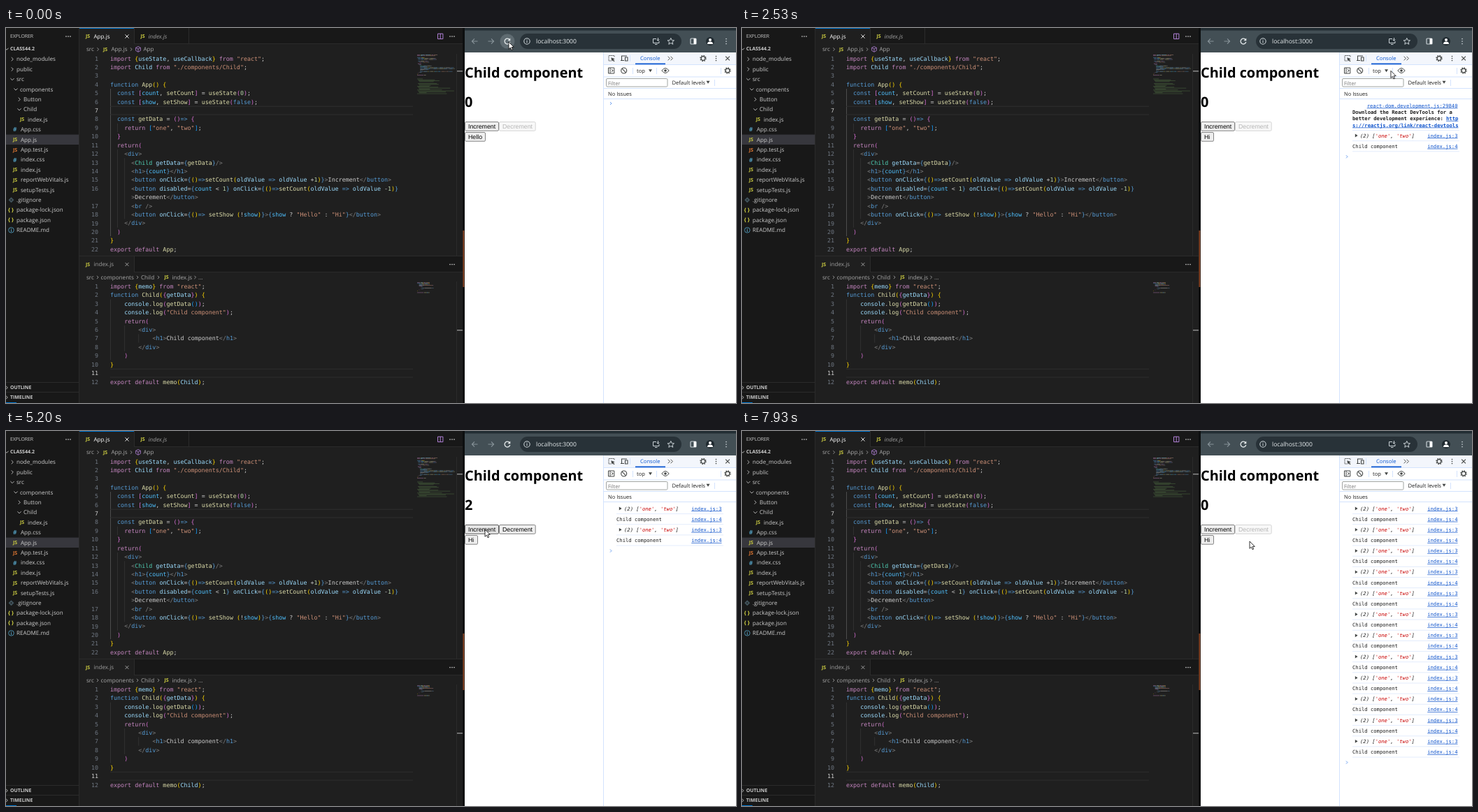
An HTML page that plays this animation: 1044x537 px, repeating every 8 s.

```html
<!DOCTYPE html>
<html lang="en">
<head>
<meta charset="utf-8">
<title>Child component</title>
<style>
html, body { margin: 0; width: 100%; height: 100%; overflow: hidden; background: #181818; }
svg { display: block; width: 100%; height: 100%; }
text { font-family: "Open Sans", "Noto Sans", sans-serif; white-space: pre; text-rendering: geometricPrecision; }
.mono { font-family: "DejaVu Sans Mono", monospace; }
.form { font-family: "Liberation Sans", Arial, sans-serif; }
</style>
</head>
<body>
<svg id="stage" viewBox="0 0 1044 537"></svg>
<script>
const LOOP = 8000, FPS = 15;
const stage = document.getElementById('stage');

// Drawing helpers; text is placed by its vertical centre
const esc = s => String(s).replace(/[&<>]/g, c => ({ '&': '&amp;', '<': '&lt;', '>': '&gt;' })[c]);
const text = (x, y, s, size, fill, more = '') =>
  `<text x="${x}" y="${y + size * .35}" font-size="${size}" fill="${fill}" ${more}>${esc(s)}</text>`;
const rect = (x, y, w, h, fill, more = '') =>
  `<rect x="${x}" y="${y}" width="${w}" height="${h}" fill="${fill}" ${more}/>`;
const line = (d, stroke, width = 1, more = '') =>
  `<path d="${d}" fill="none" stroke="${stroke}" stroke-width="${width}" ${more}/>`;
const shape = (d, fill) => `<path d="${d}" fill="${fill}"/>`;
const ring = (x, y, r, stroke, width = 1, more = '') =>
  `<circle cx="${x}" cy="${y}" r="${r}" fill="none" stroke="${stroke}" stroke-width="${width}" ${more}/>`;
const dot = (x, y, r, fill) => `<circle cx="${x}" cy="${y}" r="${r}" fill="${fill}"/>`;
const dots = (x, y, fill, dx, dy) => [-1, 0, 1].map(i => dot(x + i * dx, y + i * dy, .85, fill)).join('');
const cross = (x, y, r, stroke, width = 1) =>
  line(`M${x - r} ${y - r}l${2 * r} ${2 * r}m0 ${-2 * r}l${-2 * r} ${2 * r}`, stroke, width);
const gear = (x, y) => ring(x, y, 2.8, '#444746', 1.2) + ring(x, y, 4, '#444746', 1.4, 'stroke-dasharray="1.6 1.54"');
const right = (x, y, c = '#a0a0a0', r = 2.2) => line(`M${x - r / 2} ${y - r}l${r} ${r}l${-r} ${r}`, c, .9);
const down = (x, y) => line(`M${x - 2.6} ${y - 1.3}l2.6 2.6l2.6 -2.6`, '#c5c5c5', .9);
const caret = (x, y) => shape(`M${x - 2.5} ${y - 1.8}h5l-2.5 4z`, '#444746');
const js = (x, y, fill = '#cbcb41') => text(x, y, 'JS', 7, fill, 'font-weight="700"');

const GREY = '#a9a9a9', EDGE = '#2b2b2b', UI = 8.1;

// Code: "~" and a letter start a run of that colour
const INK = { k: '#c586c0', b: '#569cd6', v: '#9cdcfe', f: '#dcdcaa', s: '#ce9178', n: '#b5cea8', c: '#4ec9b0',
  t: '#4fc1ff', y: '#ffd700', o: '#da70d6', u: '#179fff', g: '#808080', w: '#cccccc' };
const APP = `~kimport ~y{~vuseState~w, ~vuseCallback~y} ~kfrom ~s"react"~w;
~kimport ~vChild ~kfrom ~s"./components/Child"~w;

~bfunction ~fApp~y() {
  ~bconst ~o[~tcount~w, ~fsetCount~o] ~w= ~fuseState~o(~n0~o)~w;
  ~bconst ~o[~tshow~w, ~fsetShow~o] ~w= ~fuseState~o(~bfalse~o)~w;

  ~bconst ~fgetData ~w= ~o()~b=> ~o{
    ~kreturn ~u[~s"one"~w, ~s"two"~u]~w;
  ~o}
  ~kreturn~o(
    ~g<~bdiv~g>
      ~g<~cChild ~vgetData~w=~b{~fgetData~b}~g/>
      ~g<~bh1~g>~b{~tcount~b}~g</~bh1~g>
      ~g<~bbutton ~vonClick~w=~b{~y()~b=>~fsetCount~y(~voldValue ~b=> ~voldValue ~w+~n1~y)~b}~g>~wIncrement~g</~bbutton~g>
      ~g<~bbutton ~vdisabled~w=~b{~tcount ~w< ~n1~b} ~vonClick~w=~b{~y()~b=>~fsetCount~y(~voldValue ~b=> ~voldValue ~w-~n1~y)~b}
      ~g>~wDecrement~g</~bbutton~g>
      ~g<~bbr ~g/>
      ~g<~bbutton ~vonClick~w=~b{~y()~b=> ~fsetShow ~y(~w!~tshow~y)~b}~g>~b{~tshow ~w? ~s"Hello" ~w: ~s"Hi"~b}~g</~bbutton~g>
    ~g</~bdiv~g>
  ~o)
~y}
~kexport default ~fApp~w;`.split('\n');
const CHILD = `~kimport ~y{~vmemo~y} ~kfrom ~s"react"~w;
~bfunction ~fChild~y(~o{~vgetData~o}~y) {
    ~vconsole~w.~flog~o(~fgetData~u()~o)~w;
    ~vconsole~w.~flog~o(~s"Child component"~o)~w;
    ~kreturn~o(
        ~g<~bdiv~g>
            ~g<~bh1~g>~wChild component~g</~bh1~g>
        ~g</~bdiv~g>
    ~o)
~y}

~kexport default ~fmemo~y(~vChild~y)~w;`.split('\n');
const STEP = 12.42, CHAR = 5.033, MONO = 8.36;
const runs = s => s.trim().split('~').slice(1).map(r => [INK[r[0]], r.slice(1)]);
const indent = s => s.search(/\S|$/);

function code(lines, y0, mapY, active, wrap) {
  let out = '';
  lines.forEach((s, i) => {
    const y = y0 + i * STEP, n = i < wrap ? i + 1 : i;
    if (i !== wrap) out += text(132, y, n, MONO, n === active ? '#cccccc' : '#6e7681', 'class="mono" text-anchor="end"');
    if (n === active) out += line(`M149 ${y - 5.9}H582M149 ${y + 5.9}H582`, '#303030', .9);
    const spans = runs(s).map(([c, t]) => `<tspan fill="${c}">${esc(t)}</tspan>`).join('');
    out += `<text class="mono" font-size="${MONO}" x="${149 + indent(s) * CHAR}" y="${y + 2.9}">${spans}</text>`;
    let mx = 588 + indent(s) * .66;
    for (const [c, t] of runs(s)) {
      out += rect(mx, mapY + i * 1.32, t.trim().length * .66, .8, c, 'opacity=".5"');
      mx += t.length * .66;
    }
  });
  return out;
}
const guide = (col, y0, a, b, c = '#383838') =>
  line(`M${149.5 + col * CHAR} ${y0 + (a - 1.5) * STEP}V${y0 + (b - .5) * STEP}`, c, .8);

function explorer() {
  const rows = [['>', 15, 'node_modules'], ['>', 15, 'public'], ['v', 15, 'src'], ['v', 20, 'components'],
    ['>', 25, 'Button'], ['v', 25, 'Child'], ['JS', 31, 'index.js'], ['#', 21, 'App.css'], ['JS', 21, 'App.js'],
    ['T', 21, 'App.test.js'], ['#', 21, 'index.css'], ['JS', 21, 'index.js'], ['JS', 21, 'reportWebVitals.js'],
    ['JS', 21, 'setupTests.js'], ['g', 15, '.gitignore'], ['{}', 15, 'package-lock.json'],
    ['{}', 15, 'package.json'], ['i', 15, 'README.md']];
  let out = rect(0, 0, 104, 537, '#181818') + rect(0, 152.6, 104, 14.4, '#37373d') +
    text(6, 12, 'EXPLORER', 6.9, '#cccccc') + dots(89, 12, '#cccccc', 3, 0) +
    down(1, 30) + text(6, 30, 'CLASS44.2', 7, '#cccccc', 'font-weight="700"');
  rows.forEach(([icon, x, name], i) => {
    const y = 44.6 + i * 14.4;
    if (icon === '>') out += right(x - 6, y, '#c5c5c5', 2.6);
    else if (icon === 'v') out += down(x - 6, y);
    else if (icon === 'JS') out += js(x - 11, y);
    else if (icon === 'T') out += js(x - 11, y, '#e37933');
    else if (icon === '#') out += text(x - 11, y, '#', 8.5, '#519aba', 'font-weight="700"');
    else if (icon === '{}') out += text(x - 12, y - .5, '{ }', 7.6, '#cbcb41', 'font-weight="700"');
    else if (icon === 'g') out += shape(`M${x - 7.5} ${y - 4}l4 4l-4 4l-4 -4z`, '#41535b') + dot(x - 7.5, y, 1, '#181818');
    else out += ring(x - 7.5, y, 3.8, '#519aba', .9) + text(x - 8.5, y, 'i', 6.5, '#519aba', 'font-weight="700"');
    out += text(x, y, name, UI, '#cccccc');
  });
  [[515, 'OUTLINE'], [529, 'TIMELINE']].forEach(([y, s]) => {
    out += line(`M0 ${y - 7.5}H104`, EDGE) + right(1, y, '#c5c5c5', 2.6) + text(6, y, s, 6.9, '#cccccc', 'font-weight="700"');
  });
  return out + rect(0, 536, 15, 1, '#0078d4') + rect(104, 0, 1, 537, EDGE);
}

function editors() {
  const top = 43.6, low = 370;
  let out = rect(105, 0, 549, 537, '#1f1f1f');
  // Tab bars and path bars
  out += rect(183, 0, 471, 23, '#181818') + line('M183 22.5H654M183.5 0V22M261.5 0V22', EDGE) + rect(105, 0, 78, 1, '#0078d4') +
    js(114, 12) + text(125.5, 12, 'App.js', UI, '#ffffff') + cross(173, 12, 2.6, '#e0e0e0') +
    js(192.5, 12) + text(203.5, 12, 'index.js', UI, '#9d9d9d', 'font-style="italic"') +
    line('M617.5 8.2h7.4v7.4h-7.4zM621.2 8v7.6', '#b180d7', 1) + dots(638, 12, '#cccccc', 3, 0) +
    text(115, 30.5, 'src', UI, GREY) + right(131.5, 30.5) + js(139, 30.5) + text(150.5, 30.5, 'App.js', UI, GREY) +
    right(179, 30.5) + line('M189 26.5l3.4 1.8v4l-3.4 2l-3.4 -2v-4zM185.6 28.3l3.4 1.8l3.4 -1.8M189 30.1v4', '#b180d7', .8) +
    text(196.5, 30.5, 'App', UI, GREY);
  out += rect(105, 326, 549, 1, EDGE) + rect(183, 327, 471, 23, '#181818') + line('M183 349.5H654M183.5 327V349', EDGE) +
    js(114, 338.5) + text(125.5, 338.5, 'index.js', UI, '#9d9d9d') + cross(173, 338.5, 2.4, '#9d9d9d') +
    dots(638, 338.5, '#cccccc', 3, 0) +
    text(115, 357, 'src', UI, GREY) + right(131, 357) + text(135.5, 357, 'components', UI, GREY) + right(188, 357) +
    text(193, 357, 'Child', UI, GREY) + right(218, 357) + js(226.5, 357) + text(237.5, 357, 'index.js', UI, GREY) +
    right(270.5, 357) + text(275, 357, '...', UI, GREY);
  out += guide(0, top, 5, 21, '#585858') + guide(2, top, 9, 9) + guide(2, top, 12, 20) + guide(4, top, 13, 19) +
    guide(0, low, 3, 9) + guide(4, low, 6, 8) + guide(8, low, 7, 7);
  out += code(APP, top, 38, 7, 16) + code(CHILD, low, 364, 11, 99);
  // Commented block further down in the overview
  for (let i = 0; i < 17; i++) {
    const w = i === 4 ? 0 : 8 + 44 * Math.abs(Math.sin(i * 2.3)) * (i > 9 ? 1 : .5);
    out += rect(588 + (i % 4), 72.5 + i * 1.32, w, .8, '#6a9955', 'opacity=".4"');
  }
  return out + line('M644.5 37V326M644.5 363V537', '#2b2b2b') + rect(645, 61, 8, 1.5, '#8a8a8a') + rect(645, 432, 8, 1.5, '#8a8a8a') +
    rect(653, 0, 3, 537, '#0d0f10') + rect(653.5, 290, 1.8, 81, '#99502c');
}

function browser() {
  const c = '#c9d1d5', ui = '#444746', rule = '#d3e3fd';
  let out = rect(656, 0, 388, 537, '#ffffff') + rect(656, 0, 388, 35, '#434f55') +
    rect(656, 0, 388, 3.5, '#222d33') + rect(735, 8, 231, 22, '#283238', 'rx="11"');
  out += line('M674.5 19H666.5M670 15.3L666.4 19L670 22.7', '#88949a', 1.1) +
    line('M689.5 19H697.5M694 15.3L697.6 19L694 22.7', '#88949a', 1.1) +
    ring(745, 19, 4.2, c, 1.1) + line('M745 18.3V21.3M745 16.4V17.4', c, 1.1) +
    text(758, 19, 'localhost:3000', 8.6, '#e6ebed') +
    line('M930 15.5H925.5V21.5H934V19M928 23.5H931.5M932.5 14V18M930.7 16.5L932.5 18.3L934.3 16.5', c) +
    line('M950.8 14.4l1.4 3.1l3.3 .3l-2.5 2.2l.8 3.3l-3 -1.8l-3 1.8l.8 -3.3l-2.5 -2.2l3.3 -.3z', c) +
    rect(979, 15, 8, 8, 'none', `stroke="${c}" stroke-width="1.2" rx="1"`) + rect(983.5, 15, 3.5, 8, '#ffffff') +
    dot(1007, 19, 6, '#202a30') + dot(1007, 17, 2, '#ffffff') + shape('M1003 23q0 -3.4 4 -3.4t4 3.4z', '#ffffff') +
    dots(1030, 19, c, 0, 3.5);
  // Developer tools
  out += rect(855, 35, 189, 17.5, '#f3f6fc') +
    line('M854.5 35V537M855 52.5H1044M855 70H1044M855 86.5H1044M855 101.5H1044', rule) +
    line('M892.5 39V48M896.5 57V66M930.5 57V66M1013.5 74V83M1022.5 57V66', rule) +
    line('M865 47H862V39.5H870V42', ui, 1, 'stroke-dasharray="1.5 .8"') +
    shape('M865.3 42.3l5.5 2l-2.3 1l2 2l-1 1l-2 -2l-1 1.8z', ui) +
    line('M888 40H880.5V46M879 46.5H884M885.5 42H889V47H885.5Z', ui, 1.1) +
    text(907, 43.5, 'Console', 7.6, '#0b57d0') + rect(900, 50.5, 43, 1.7, '#0b57d0') +
    right(948, 43.5, ui, 2.8) + right(952, 43.5, ui, 2.8) + gear(997, 43.5) + dots(1015.5, 43.5, ui, 0, 3) + cross(1032, 43.5, 2.9, ui, 1.1) +
    line('M861.5 57H869.8V65H861.5ZM864 57V65M866 59.3L868.3 61L866 62.7', ui) +
    ring(883.7, 61, 4, ui, 1.1) + line('M881 58.2L886.5 63.8', ui, 1.1) +
    text(902, 61.5, 'top', 7.6, '#1f1f1f') + caret(921.5, 61) +
    line('M937.8 61Q943 54 948.2 61Q943 68 937.8 61Z', ui) + dot(943, 61, 1.8, ui) + gear(1032, 61) +
    rect(858.5, 72.5, 87.5, 11.5, '#ffffff', 'stroke="#8a8d8c" stroke-width=".8" rx="1.5"') +
    text(861, 79, 'Filter', 7.4, '#757575') + text(952.5, 78, 'Default levels', 7.6, '#1f1f1f') + caret(1004, 77.5) +
    text(861, 94, 'No Issues', 7.5, '#1f1f1f');
  return out + text(656, 64, 'Child component', 19.9, '#000000', 'font-weight="700"');
}

// Times at which things happen, in ms
const UP = [4930, 5130, 5330, 5530], DOWN = [6060, 6260, 6460, 6600], TOGGLE = [7330, 7460, 7600, 7730];
const CLICK = 460, INTRO = 1000, LOADED = 1200, STATUS_OFF = 1460, CLEAR = 4060, PRESS = 66;
const PATH = [[0, 719, 20], [330, 719, 20], [1130, 690, 141], [1330, 689, 142], [1860, 689, 142], [2460, 935, 60],
  [2730, 896, 67], [2980, 866, 74], [3200, 882, 63], [3460, 882, 63], [3730, 881, 64], [3930, 883, 62], [4130, 883, 62],
  [4730, 686, 141], [4930, 685, 141], [5530, 685, 141], [5730, 728, 142], [5930, 733, 142], [6600, 733, 142],
  [6870, 665, 157], [6930, 664, 158], [7000, 664, 158], [7130, 664, 159], [7730, 664, 159], [7930, 726, 158]];

const passed = (times, t) => times.filter(x => x <= t).length;
function pointer(t) {
  const i = PATH.findIndex(p => p[0] > t);
  if (i < 0) return PATH.at(-1).slice(1);
  const [a, b] = [PATH[i - 1], PATH[i]], k = (t - a[0]) / (b[0] - a[0]), e = k * k * (3 - 2 * k);
  return [a[1] + (b[1] - a[1]) * e, a[2] + (b[2] - a[2]) * e];
}

function button(x, y, w, label, [px, py], idle, off) {
  const hover = !idle && !off && px >= x && px < x + w && py >= y && py < y + 13.5;
  return rect(x + .5, y + .5, w - 1, 12.7, hover ? '#e5e5e5' : off ? '#f8f8f8' : '#efefef',
    `rx="1.5" stroke="${off ? '#d2d2d2' : hover ? '#4f4f4f' : '#767676'}" stroke-width=".9"`) +
    text(x + 5, y + 6.8, label, 8.8, off ? '#b5b5b5' : '#000000', 'class="form"');
}

function consoleLog(n, intro) {
  const mono = 'class="mono"', bold = mono + ' font-weight="700"', under = ' text-decoration="underline"';
  const say = (x, y, s, fill, more = mono) => text(x, y, s, 7.2, fill, more);
  const link = (y, s) => say(1023.5, y, s, '#1155cc', mono + under + ' text-anchor="end"');
  const sep = y => line(`M873 ${y}H1026`, '#dce8fb', .8);
  let out = '', y = 111;
  if (intro) {
    out += link(111, 'react-dom.development.js:29840') + say(873, 120, 'Download the React DevTools for a', '#1f1f1f', bold) +
      say(873, 129.3, 'better development experience: ', '#1f1f1f', bold) + say(1007, 129.3, 'http', '#1155cc', bold + under) +
      say(873, 139, 's://reactjs.org/link/react-devtools', '#1155cc', bold + under) + sep(146.5);
    y = 154;
  }
  for (let i = 0; i < n; i++, y += 15.15) {
    if (i % 2) out += say(873, y, 'Child component', '#1f1f1f') + link(y, 'index.js:4');
    else out += shape(`M876.8 ${y - 2.4}v4.8l3.8 -2.4z`, '#444746') +
      `<text class="mono" font-size="7.2" font-style="italic" x="884" y="${y + 2.5}" fill="#1f1f1f">(2) [` +
      `<tspan fill="#c80000">'one'</tspan>, <tspan fill="#c80000">'two'</tspan>]</text>` + link(y, 'index.js:3');
    out += sep(y + 7.6);
  }
  return out + right(865, n || intro ? y : 108, '#5b93ec', 2);
}

function scene(t) {
  const at = pointer(t), [x, y] = at;
  const up = passed(UP, t), down = passed(DOWN, t), flips = passed(TOGGLE, t), count = up - down;
  const hello = t < LOADED || flips % 2, loading = t >= CLICK && t < LOADED;
  const logs = t < LOADED ? 0 : t < CLEAR ? 2 : 2 * (up + down + flips);
  const pressed = [...UP, ...DOWN, ...TOGGLE].some(c => t >= c && t < c + PRESS);
  let out = Math.hypot(x - 717, y - 19) < 10 ? dot(717, 19, 10.5, '#5f6b71') : '';
  out += loading ? cross(717, 19, 3.2, '#e3e8ea', 1.3)
    : line('M720.3 17A3.9 3.9 0 1 0 720.8 20', '#e3e8ea', 1.3) + shape('M721.3 14.5V18.3H717.5Z', '#e3e8ea');
  out += text(656, 106, count, 19.9, '#000000', 'font-weight="700"') +
    button(656, 134, 49, 'Increment', at, pressed) + button(705, 134, 52.7, 'Decrement', at, pressed, count < 1) +
    (hello ? button(656, 149, 30, 'Hello', at, pressed) : button(656, 149, 19, 'Hi', at, pressed)) +
    consoleLog(logs, t >= INTRO && t < CLEAR);
  if (t >= CLICK && t < STATUS_OFF)
    out += rect(656, 531, 64, 8, '#92989c', 'rx="2"') + text(659, 538, 'Connecting...', 7.8, '#e4e7e9');
  return out + `<path transform="translate(${x} ${y})" d="M0 0V10.3L2.4 8.1L4 11.7L5.7 11L4.1 7.4H7.3Z" fill="#fff" stroke="#000" stroke-width=".8"/>`;
}

stage.innerHTML = explorer() + editors() + browser() + '<g id="live"></g>';
const live = document.getElementById('live');
let shown = -1;
function tick() {
  const step = Math.floor((performance.now() % LOOP + 4) * FPS / 1000);
  if (step !== shown) live.innerHTML = scene((shown = step) * 1000 / FPS);
  requestAnimationFrame(tick);
}
tick();
</script>
</body>
</html>
```
